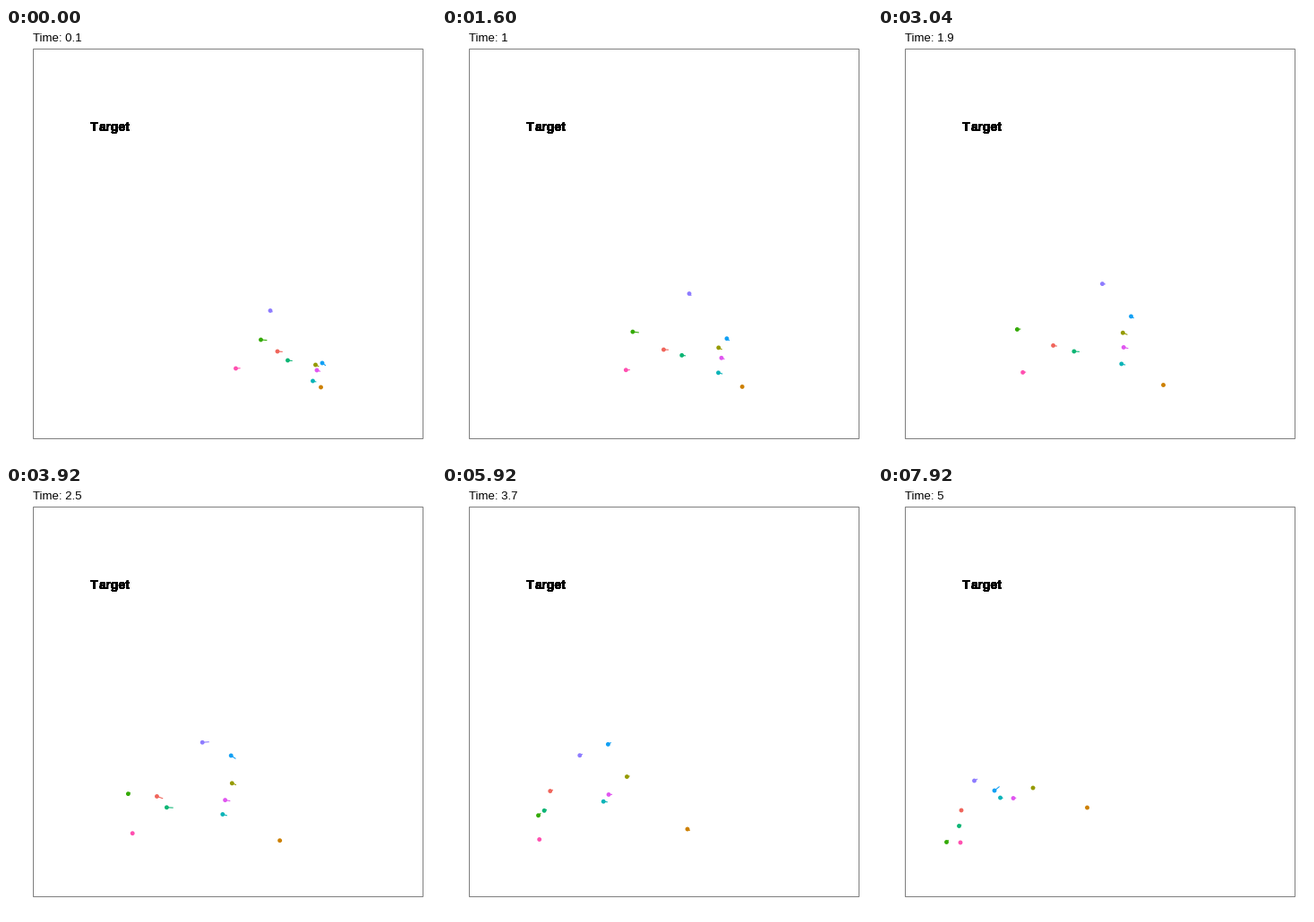
Write a matplotlib script that moves like this. It is 480 px wide and 480 px high and loops after 8000 ms.

```python
import numpy as np
import matplotlib.pyplot as plt
from matplotlib.animation import FuncAnimation
from matplotlib.collections import LineCollection
from matplotlib.patches import Rectangle

SIZE, DPI = 480, 72
FRAMES, FRAME_MS = 100, 80
LAG = 2                              # frames per step of a walk
KEYS = np.array([1, 38, 64, 99])     # frames at which key points are reached

DOTS = {
    "#f0655b": [(303, 361), (196, 354.5), (136, 337.5), (93, 362)],
    "#cd8000": [(351.5, 401), (318.5, 398.5), (288, 390), (233.5, 359)],
    "#959a00": [(345.5, 376), (274, 340.5), (223, 323.5), (173, 337)],
    "#34aa06": [(284.5, 348), (155, 336.5), (120, 357.5), (76.5, 397.5)],
    "#0cb574": [(314.5, 371), (219.5, 361), (132, 358.5), (90.5, 379.5)],
    "#0cb4b8": [(342.5, 394), (272, 375), (202, 356), (136.5, 348)],
    "#12a0f4": [(353, 374), (281, 321), (208.5, 281.5), (130, 340)],
    "#8e7cff": [(295, 315.5), (250, 285.5), (175, 293), (107.5, 329)],
    "#e056f0": [(347, 382), (274.5, 356.5), (205, 345), (151, 348.5)],
    "#ff4fb0": [(256.5, 380), (161, 384.5), (119, 392.5), (92, 398)],
}
COLORS = list(DOTS)
POINTS = np.array(list(DOTS.values()))
SLOPES = np.gradient(POINTS, KEYS, axis=1)


def place(t):
    """Smooth curve through each dot's key points; t is (dots, times)."""
    seg = np.clip(np.searchsorted(KEYS, t, side="right") - 1, 0, len(KEYS) - 2)
    row = np.arange(len(t))[:, None]
    span = (KEYS[seg + 1] - KEYS[seg])[..., None]
    u = (t - KEYS[seg])[..., None] / span
    p0, p1 = POINTS[row, seg], POINTS[row, seg + 1]
    m0, m1 = SLOPES[row, seg] * span, SLOPES[row, seg + 1] * span
    return ((2 * u**3 - 3 * u**2 + 1) * p0 + (u**3 - 2 * u**2 + u) * m0
            + (3 * u**2 - 2 * u**3) * p1 + (u**3 - u**2) * m1)


def walk():
    """Positions from frame -1 on: uneven steps, straight in between."""
    rng = np.random.default_rng(7)
    t = np.arange(-1, FRAMES, LAG)
    jitter = rng.uniform(-0.8, 0.8, (len(POINTS), len(t)))
    jitter[:, [0, 1, -1]] = 0        # exact start and end
    steps = place(t + jitter)
    path = np.empty((len(POINTS), FRAMES + 1, 2))
    path[:, ::2] = steps
    path[:, 1::2] = (steps[:, 1:] + steps[:, :-1]) / 2
    return path


PATHS = walk()

fig = plt.figure(figsize=(SIZE / DPI, SIZE / DPI), dpi=DPI, facecolor="white")
ax = fig.add_axes([0, 0, 1, 1])
ax.set(xlim=(0, SIZE), ylim=(SIZE, 0))
ax.axis("off")
ax.add_patch(Rectangle((30.5, 23.5), 435, 435, fill=False, ec="#7f7f7f",
                       lw=1, snap=False))


def label(x, y, text, size, **style):
    return ax.text(x, y, text, size=size, va="baseline", color="black",
                   family="Liberation Sans", **style)


# one copy per dot gives heavy letters; split so that "Ta" is not kerned
for _ in DOTS:
    label(102.7, 115, "T", 14.23, weight="bold", ha="right")
    label(103.2, 115, "arget", 14.23, weight="bold", ha="left")

clock = label(30, 15, "", 13.2)
trails = ax.add_collection(LineCollection([], colors=COLORS, lw=1.07, zorder=3))
dots = ax.scatter(*PATHS[:, 0].T, s=23.5, c=COLORS, lw=0, zorder=4)


def update(i):
    k = max(i, 1)                    # the opening pose lasts two frames
    now, before = PATHS[:, k + 1], PATHS[:, k + 1 - LAG]
    dots.set_offsets(now)
    trails.set_segments(np.stack([now, before], axis=1))
    clock.set_text(f"Time: {round(0.1 + (k - 1) * 9.9 / 199, 1):g}")
    return dots, trails, clock


anim = FuncAnimation(fig, update, frames=FRAMES, interval=FRAME_MS,
                     repeat=True, repeat_delay=0, blit=False)
plt.show()
```
